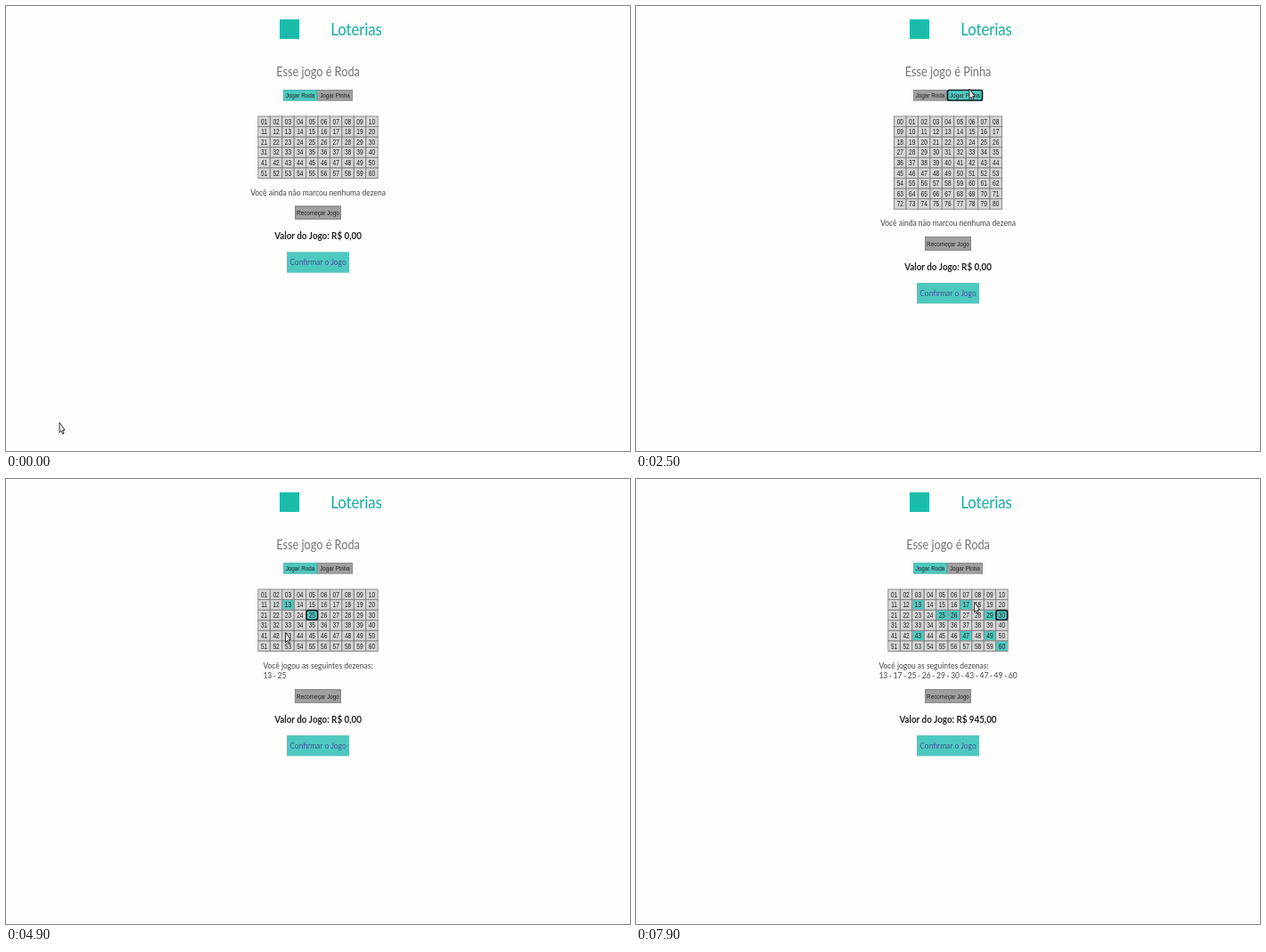
An HTML page with a canvas for the animation above (8 s loop, 700x500 px).

```html
<!DOCTYPE html>
<html lang="pt-BR">
<head>
<meta charset="utf-8">
<title>Loterias</title>
<style>
  html, body { margin: 0; width: 100%; height: 100%; overflow: hidden; background: #fefefd; }
  canvas { display: block; }
</style>
</head>
<body>
<canvas id="stage" width="700" height="500"></canvas>
<script>
const ctx = document.getElementById('stage').getContext('2d');
const LOOP = 8000, STEP = 100, MID = 350;
const TEAL = '#4dc9c0', GRAY = '#a0a0a0', CELL = '#d6d6d6', LINE = '#858585', INK = '#222';
// The page is shown narrower than it was laid out, so type is condensed per family.
const SANS = { family: '"Liberation Sans", Arial, sans-serif', squeeze: 0.79 };
const LATO = { family: 'Lato, sans-serif', squeeze: 0.86 };
const PITCH_X = 13.42, PITCH_Y = 11.58, GRID_TOP = 124, LINE_HEIGHT = 11.7;

const GAMES = [
  { name: 'Roda', cols: 10, rows: 6, first: 1 },
  { name: 'Pinha', cols: 9, rows: 9, first: 0 }
];
const TABS = [{ x: 311, w: 38 }, { x: 349, w: 40 }];
const TAB_PRESS = [3100, 2100], TAB_DELAY = 450;

const PICKS = [13, 25, 43, 47, 26, 29, 49, 60, 17, 30];
const pressTime = i => 4200 + i * 380;

const gridLeft = game => MID - game.cols * PITCH_X / 2;

function cellAt(game, n) {
  const i = n - game.first;
  return {
    x: gridLeft(game) + i % game.cols * PITCH_X,
    y: GRID_TOP + Math.floor(i / game.cols) * PITCH_Y
  };
}

function cellStop(t, n) {
  const { x, y } = cellAt(GAMES[0], n);
  return { t, x: x + PITCH_X / 2 - 4, y: y + PITCH_Y / 2 - 3 };
}

// The pointer wanders first, then visits both tabs and every picked cell.
const STOPS = [
  { t: 100, x: 392, y: 130 },
  { t: 500, x: 346, y: 149 },
  { t: 900, x: 534, y: 163 },
  { t: 1500, x: 290, y: 170 },
  { t: TAB_PRESS[1], x: 374, y: 93 },
  { t: TAB_PRESS[0], x: 333, y: 95 },
  ...PICKS.map((n, i) => cellStop(pressTime(i), n)),
  cellStop(7900, 18)
];
const TRAVEL = 300;

function pointerAt(t) {
  if (t < STOPS[0].t) return { x: 60, y: 468 };
  const i = STOPS.findIndex(s => s.t > t);
  if (i < 0) return STOPS[STOPS.length - 1];
  const from = STOPS[i - 1], to = STOPS[i];
  const u = Math.max(0, 1 - (to.t - t) / Math.min(TRAVEL, to.t - from.t));
  const k = u * (2 - u);
  return { x: from.x + (to.x - from.x) * k, y: from.y + (to.y - from.y) * k };
}

let squeeze = 1;
function setFont(size, font, weight = 400) {
  ctx.font = `${weight} ${size}px ${font.family}`;
  squeeze = font.squeeze;
}

function label(text, x, y, color, align = 'center') {
  ctx.save();
  ctx.translate(x, y);
  ctx.scale(squeeze, 1);
  ctx.textAlign = align;
  ctx.fillStyle = color;
  ctx.fillText(text, 0, 0);
  ctx.restore();
}

const widthOf = text => ctx.measureText(text).width * squeeze;
const twoDigits = n => String(n).padStart(2, '0');

function box(x, y, w, h, fill, stroke) {
  ctx.fillStyle = fill;
  ctx.fillRect(x, y, w, h);
  ctx.strokeStyle = stroke;
  ctx.lineWidth = 1;
  ctx.strokeRect(x + 0.5, y + 0.5, w - 1, h - 1);
}

function ring(x, y, w, h) {
  ctx.strokeStyle = '#17222a';
  ctx.lineWidth = 1.7;
  ctx.beginPath();
  ctx.roundRect(x + 0.5, y + 0.5, w - 1, h - 1, 2);
  ctx.stroke();
}

function drawHeader(game) {
  ctx.fillStyle = '#1cbcab';
  ctx.fillRect(307, 15, 22, 22);
  setFont(19.4, LATO);
  label('Loterias', 393, 32.5, '#17ada0');
  setFont(14.8, LATO);
  label('Esse jogo é ' + game.name, MID, 79, '#737373');
}

function drawTabs(active, focus) {
  setFont(8, SANS);
  TABS.forEach((tab, i) => {
    const on = i === active;
    box(tab.x, 94, tab.w, 12.5, on ? TEAL : GRAY, on ? '#58b5ae' : '#8d8d8d');
    label('Jogar ' + GAMES[i].name, tab.x + tab.w / 2, 103, INK);
    if (i === focus) ring(tab.x, 94, tab.w, 12.5);
  });
}

function drawGrid(game, picked, focus) {
  setFont(8.3, SANS);
  ctx.lineWidth = 1;
  ctx.strokeStyle = LINE;
  for (let i = 0; i < game.cols * game.rows; i++) {
    const n = i + game.first;
    const { x, y } = cellAt(game, n);
    ctx.fillStyle = picked.includes(n) ? TEAL : CELL;
    ctx.fillRect(x + 0.5, y + 0.5, PITCH_X - 1, PITCH_Y - 1);
    ctx.strokeRect(x, y, PITCH_X, PITCH_Y);
    label(twoDigits(n), x + PITCH_X / 2, y + 8.6, INK);
  }
  if (focus !== undefined) {
    const { x, y } = cellAt(game, focus);
    ring(x, y, PITCH_X, PITCH_Y);
  }
}

function drawMessage(picked, y) {
  setFont(9.9, LATO);
  if (!picked.length) {
    label('Você ainda não marcou nenhuma dezena', MID, y, '#444');
    return;
  }
  const title = 'Você jogou as seguintes dezenas:';
  const list = picked.map(twoDigits).join(' - ');
  const titleWidth = widthOf(title);
  ctx.wordSpacing = '-0.7px';
  const left = MID - Math.max(titleWidth, widthOf(list)) / 2;
  label(list, left, y + LINE_HEIGHT, '#444', 'left');
  ctx.wordSpacing = '0px';
  label(title, left, y, '#444', 'left');
}

// Six numbers cost 4.50; more numbers pay for every combination of six.
function price(count) {
  let combos = count < 6 ? 0 : 1;
  for (let i = 1; i <= count - 6; i++) combos *= (6 + i) / i;
  return (combos * 4.5).toFixed(2).replace('.', ',');
}

function drawFooter(count, shift) {
  box(324, 224.5 + shift, 52, 15.5, GRAY, LINE);
  setFont(8, SANS);
  label('Recomeçar Jogo', MID, 235 + shift, INK);
  setFont(11.4, LATO, 700);
  label('Valor do Jogo: R$ ' + price(count), MID, 262.3 + shift, INK);
  box(315, 276.5 + shift, 70, 23, TEAL, '#5cc4bc');
  setFont(9.8, LATO);
  label('Confirmar o Jogo', MID, 291.3 + shift, '#47549b');
}

function drawPointer({ x, y }) {
  ctx.save();
  ctx.translate(x, y);
  ctx.fillStyle = '#f4f4f4';
  ctx.strokeStyle = '#333';
  ctx.lineWidth = 1;
  const arrow = new Path2D('M0 0V11.5L2 9.2 3.6 13 5 12.2 3.6 8.6 6 8.4Z');
  ctx.fill(arrow);
  ctx.stroke(arrow);
  ctx.restore();
}

function focusedTab(t) {
  if (t >= pressTime(0) || t < TAB_PRESS[1]) return -1;
  return t >= TAB_PRESS[0] ? 0 : 1;
}

function draw(t) {
  const active = t >= TAB_PRESS[1] + TAB_DELAY - 50 && t < TAB_PRESS[0] + TAB_DELAY ? 1 : 0;
  const game = GAMES[active];
  const pressed = PICKS.filter((n, i) => t >= pressTime(i));
  const picked = PICKS.filter((n, i) => t >= pressTime(i) + STEP).sort((a, b) => a - b);
  const shift = (game.rows - 6) * PITCH_Y;

  ctx.fillStyle = '#fefefd';
  ctx.fillRect(0, 0, 700, 500);
  drawHeader(game);
  drawTabs(active, focusedTab(t));
  drawGrid(game, picked, pressed[pressed.length - 1]);
  drawMessage(picked, 212.5 + shift);
  drawFooter(pressed.length, shift + (picked.length ? LINE_HEIGHT : 0));
  drawPointer(pointerAt(t));
}

const start = performance.now();
function tick() {
  const t = (performance.now() - start) % LOOP;
  draw(Math.floor(t / STEP) * STEP);
  requestAnimationFrame(tick);
}
tick();
</script>
</body>
</html>
```
